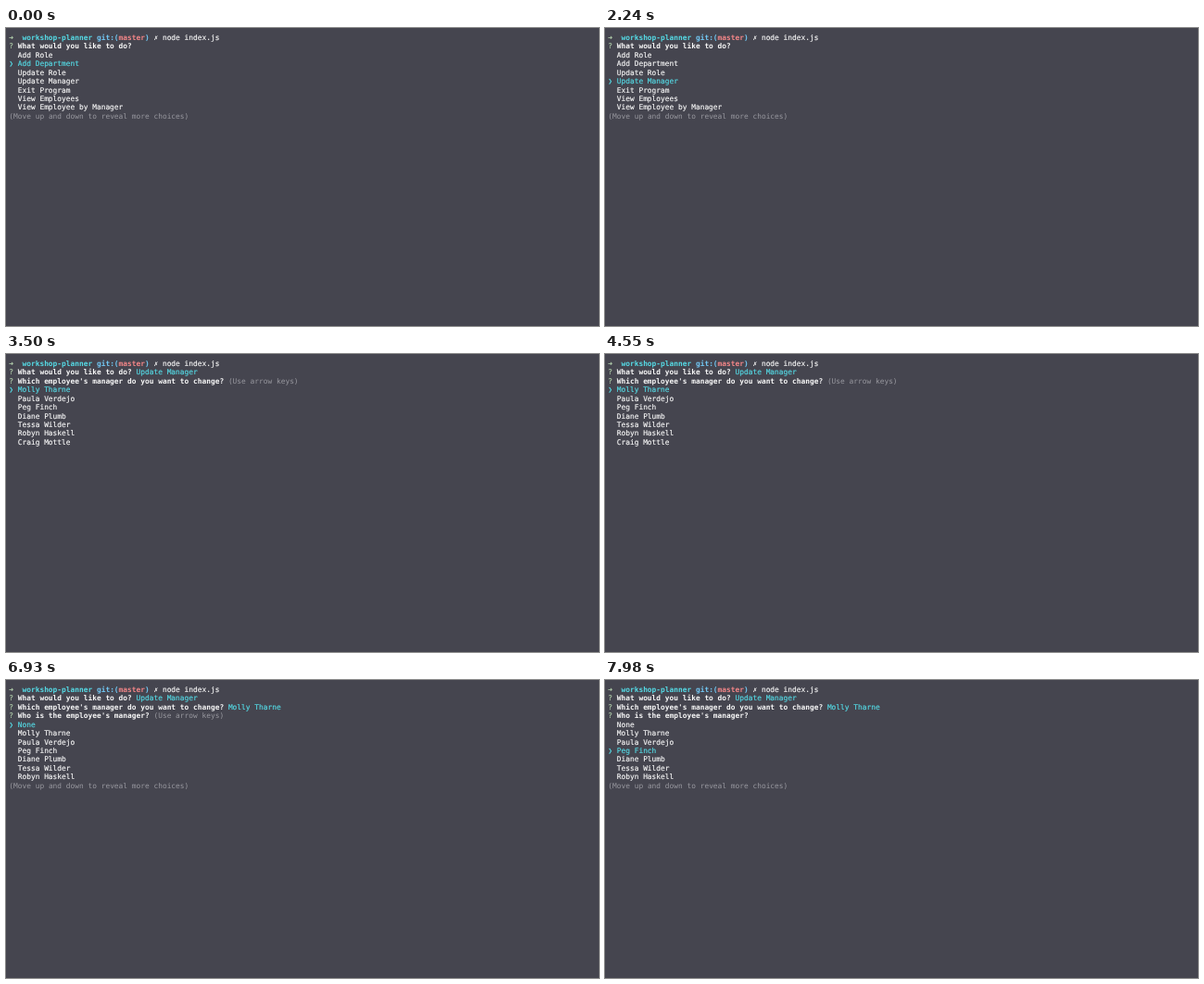
Recreate the animation shown at these times as an HTML page. Size 640 by 322 pixels, loop 8000 ms.

```html
<!DOCTYPE html>
<html lang="en">
<head>
<meta charset="utf-8">
<title>Terminal prompt</title>
<style>
  html, body { margin: 0; width: 100%; height: 100%; overflow: hidden; background: #45454f; }
  svg { display: block; width: 100%; height: 100%; }
  text {
    font-family: "DejaVu Sans Mono", "DejaVu Sans", monospace;
    font-size: 7.86px;
    text-rendering: geometricPrecision;
    white-space: pre;
    color: #f8f8f8;
    fill: currentColor;
    stroke: currentColor;
    stroke-width: 0.16px;
  }
  .bold { font-weight: bold; stroke: none; }
  .cyan { color: #55dbe6; }
  .blue { color: #72c8f4; }
  .red { color: #f38688; }
  .green { color: #b4d2ae; }
  .dim { color: #98989f; stroke: none; }
</style>
</head>
<body>
<svg id="screen" viewBox="0 0 640 322"></svg>
<script>
const LOOP = 8000;
const LEFT = 3.3, BASE = 12.8, CHAR = 4.732, LINE = 9.45;
const PAGE = 7;

const actions = ["Add Role", "Add Department", "Update Role", "Update Manager",
  "Exit Program", "View Employees", "View Employee by Manager", "Add Employee"];
const people = ["Molly Tharne", "Paula Verdejo", "Peg Finch", "Diane Plumb",
  "Tessa Wilder", "Robyn Haskell", "Craig Mottle"];

const prompts = [
  { ask: "What would you like to do?", items: actions },
  { ask: "Which employee's manager do you want to change?", items: people },
  { ask: "Who is the employee's manager?", items: ["None", ...people] }
];

// Each key press leads to a prompt, a selected item and possibly a hint.
const steps = [
  { at: 0, prompt: 0, pick: 1 },
  { at: 1390, prompt: 0, pick: 2 },
  { at: 2020, prompt: 0, pick: 3 },
  { at: 2370, prompt: 1, pick: 0, hint: true },
  { at: 5385, prompt: 2, pick: 0, hint: true },
  { at: 6990, prompt: 2, pick: 1 },
  { at: 7340, prompt: 2, pick: 2 },
  { at: 7690, prompt: 2, pick: 3 }
];
const answers = ["Update Manager", people[0]];

const screen = document.getElementById("screen");

function put(row, col, str, style = "") {
  const el = document.createElementNS("http://www.w3.org/2000/svg", "text");
  el.setAttribute("x", LEFT + col * CHAR);
  el.setAttribute("y", BASE + row * LINE);
  el.setAttribute("class", style);
  el.textContent = str;
  screen.append(el);
}

// Writes [text, style] parts one after another on a row.
function line(row, ...parts) {
  let col = 0;
  for (const [str, style] of parts) {
    if (str.trim()) put(row, col, str, style);
    col += str.length;
  }
}

function question(row, ask, tail, style) {
  line(row, ["?", "green"], [" "], [ask, "bold"], [" "], [tail, style]);
}

function draw({ prompt, pick, hint }) {
  screen.replaceChildren();
  line(0, ["➜", "green"], ["  "], ["workshop-planner", "bold cyan"], [" "],
    ["git:(", "bold blue"], ["master", "bold red"], [")", "bold blue"], [" "],
    ["✗", "bold"], [" "], ["node index.js"]);

  for (let i = 0; i < prompt; i++) question(i + 1, prompts[i].ask, answers[i], "cyan");

  const { ask, items } = prompts[prompt];
  question(prompt + 1, ask, hint ? "(Use arrow keys)" : "", "dim");

  const top = prompt + 2;
  items.slice(0, PAGE).forEach((item, i) => {
    const on = i === pick;
    line(top + i, [on ? "❯" : " ", "bold cyan"], [" "], [item, on ? "cyan" : ""]);
  });
  if (items.length > PAGE) {
    put(top + PAGE, 0, "(Move up and down to reveal more choices)", "dim");
  }
}

let shown;
function update(now) {
  const t = now % LOOP;
  const step = steps.findLast(s => s.at <= t);
  if (step !== shown) draw(shown = step);
}

const start = performance.now();
function tick() {
  update(performance.now() - start);
  requestAnimationFrame(tick);
}
tick();
</script>
</body>
</html>
```
